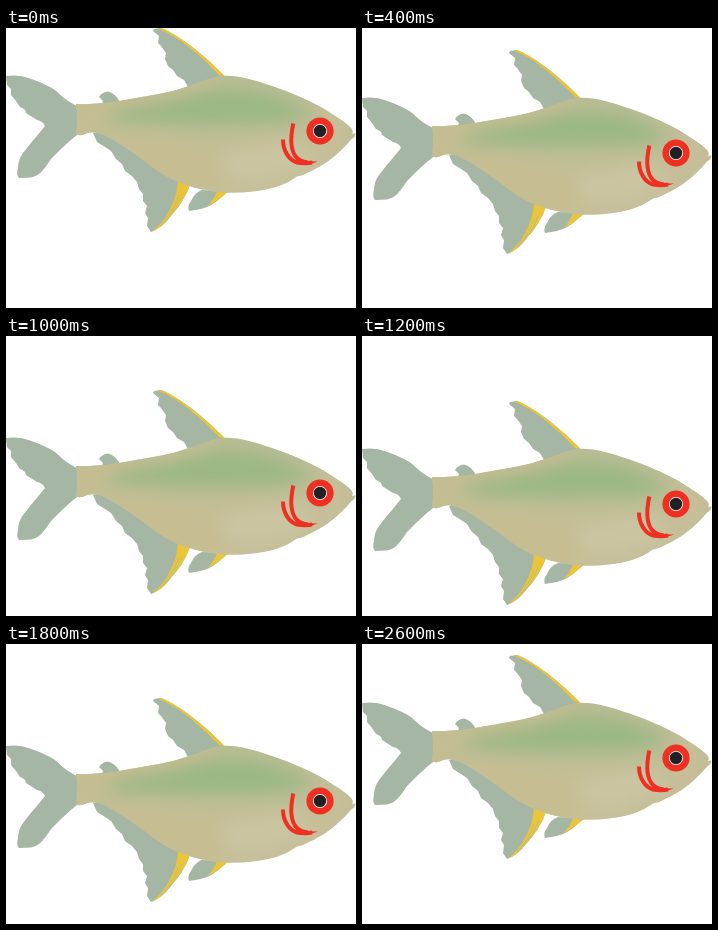
Write an HTML page that moves like this. It is 350 px wide and 280 px high and loops after 2.8 s.

```html
<!DOCTYPE html>
<html lang="en">
<head>
<meta charset="utf-8">
<title>Bobbing fish</title>
<style>
html, body { margin: 0; width: 100%; height: 100%; overflow: hidden; background: #fff; }
svg { display: block; width: 100vw; height: 100vh; }
</style>
</head>
<body>
<svg viewBox="0 0 350 280">
  <defs>
    <linearGradient id="skin" x1="0" y1="47" x2="0" y2="165" gradientUnits="userSpaceOnUse">
      <stop offset="0" stop-color="#babd93"/>
      <stop offset=".3" stop-color="#b4bc92"/>
      <stop offset=".62" stop-color="#c3be96"/>
      <stop offset="1" stop-color="#c6bf9a"/>
    </linearGradient>
    <filter id="soft" x="-40%" y="-60%" width="180%" height="220%">
      <feGaussianBlur stdDeviation="8"/>
    </filter>
    <path id="body" d="M70 76Q92 77 113 73L150 66.500C168 63.500 184 58 201 51.500C212 46.500 226 46.500 243 51C255 54 270 59 285 65C302 72 316 79 329 88Q339 94 345 100Q347.500 103 346 106L349.500 105.500Q349 109 345.500 111C332 127 317 138 303 144Q297 148 291 148.500C278 158 263 162 247 163.500Q232 165.500 217 164.500C203 163 192 161 181 157C164 152 151 143 136 131C123 122 108 111 94 105.500Q86 103 80 105.500Q75 108.500 70 106.500Q72 91 70 76Z"/>
    <clipPath id="inside"><use href="#body"/></clipPath>
  </defs>
  <g id="fish">
    <g fill="#a5b6a4">
      <path d="M0 48Q13 46 24 50.500Q33 53.500 41 57.500Q49 61 55 67.500Q62 74 75 80V104L66 111L55 121L45 131Q38 142 33 146Q29 149 25 149.500L13 150Q10 147 12 140Q12 132 17 125L24 116L30 109L39 98Q37 93 31 92L20 85Q20 81 14 79L10 73L5 67L5 61L1 57Z"/>
      <path d="M148 1L154 0Q168 6 185 18Q202 31 218 48L182 59L178 52L171 48L167 42L162 38L159 31L160 25L155 18L152 15L153 8L147 3Z"/>
      <path d="M95 78L97 73L93 69Q96 64 102 63.500Q109 65 114 74L105 78Z"/>
      <path d="M87 105L91 114L99 119L105 123L110 131L116 136L119 143L126 148L131 154L133 161L137 166L137 173L141 178L139 185L142 190L141 198L145 204Q156 200 164 189Q178 174 184 157L150 130L94 103Z"/>
      <path d="M183 183Q181 178 185 173Q188 165 196 162L222 163L211 173Q201 181 189 182Z"/>
    </g>
    <g fill="#eac53a">
      <path d="M152 .5L156 0Q168 5 185 18Q203 32 219 48L213 47Q199 32 183 19Q168 7 152 .5Z"/>
      <path d="M172 153L184 157Q178 174 164 189Q156 200 146 203.500Q157 195 163 183Q171 169 172 153Z"/>
      <path d="M211 163L222 164L211 173L201 178Q208 172 211 163Z"/>
    </g>
    <path d="M176 166Q172 181 156 197M172 169Q167 185 154 198" fill="none" stroke="#b8ba86" stroke-width=".8"/>
    <use href="#body" fill="url(#skin)"/>
    <g clip-path="url(#inside)">
      <g filter="url(#soft)">
        <path d="M55 60H95L145 58L200 43L208 54L160 69L110 78L85 115H55Z" fill="#c5bd92"/>
        <path d="M90 101L155 110L205 124L225 150L200 170L150 155Z" fill="#c6be91"/>
        <path d="M105 85Q165 76 205 63Q236 60 270 70L306 85Q270 96 235 94Q180 97 105 91Z" fill="#9bb784"/>
        <path d="M275 51L350 85V130L307 145L288 115L315 89Z" fill="#c5be98"/>
        <path d="M215 125L285 112L310 135L255 153L220 150Z" fill="#cac4a2"/>
      </g>
    </g>
    <g fill="none" stroke="#ee3022" stroke-width="4">
      <path d="M287.300 95.500C284 111 284 123 291 130Q295 134 302 134.500"/>
      <path d="M277 111.500C277 123 283 132 291 134.500Q299 136 306 134.500"/>
    </g>
    <path d="M294 131Q302 134 312 133.500Q301 138.500 288 135Z" fill="#ee3022"/>
    <circle cx="314" cy="103" r="13.600" fill="#ee3022"/>
    <circle cx="314" cy="103" r="7" fill="#fff"/>
    <circle cx="314" cy="103" r="6.200" fill="#202124"/>
  </g>
</svg>
<script>
const fish = document.getElementById('fish');
const HOLD = 200, STEPS = 14, DROP = 76;

function draw(ms) {
  const step = Math.floor(ms / HOLD) % STEPS;
  const depth = Math.min(step, STEPS - step) / (STEPS / 2);
  fish.setAttribute('transform', `translate(0 ${Math.round(DROP * depth)})`);
}

const start = performance.now();
function tick() {
  draw(performance.now() - start);
  requestAnimationFrame(tick);
}
tick();
</script>
</body>
</html>
```
